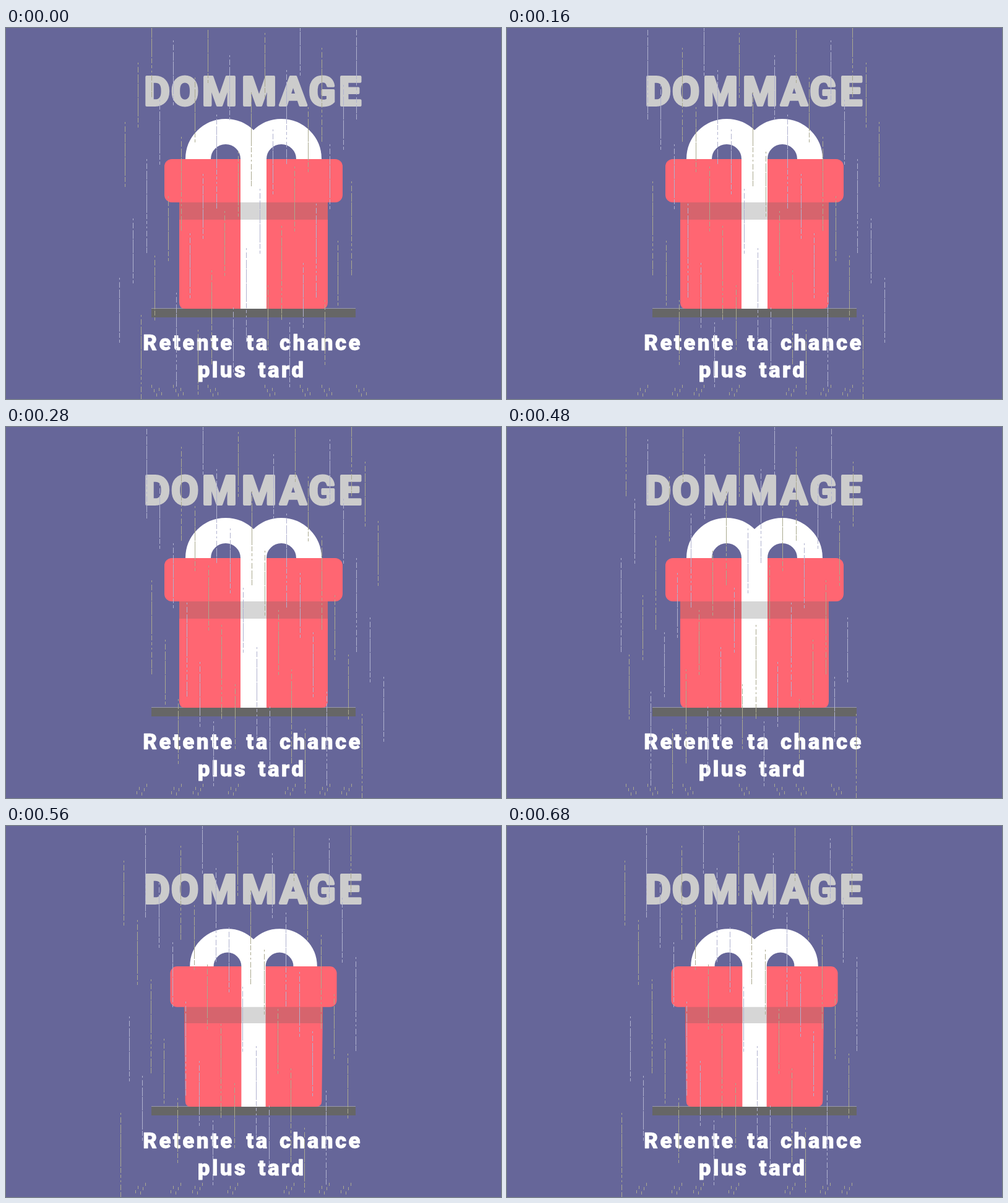
Write an HTML page that moves like this. It is 800 by 600 pixels and loops after 760 ms.

```html
<!DOCTYPE html>
<html lang="fr">
<head>
<meta charset="utf-8">
<title>Dommage</title>
<style>
  html, body { margin: 0; width: 100%; height: 100%; overflow: hidden; background: #669; }
  svg { display: block; width: 100vw; height: 100vh; }
  text { font-family: Roboto, sans-serif; text-anchor: middle; stroke-linejoin: round; }
  #title { font-size: 64px; font-weight: 700; font-stretch: 87.5%; fill: #ccc; stroke: #ccc; stroke-width: 4; }
  #hint { font-size: 35px; font-weight: 800; letter-spacing: 3.4px; fill: #fff; stroke: #fff; stroke-width: .8; }
  .rain path { fill: none; stroke-width: 1; shape-rendering: crispEdges; }
  .drops { stroke-dasharray: 3 4 9 3 14 1 22 1 30 2 8 3 5 4; }
</style>
</head>
<body>
<svg viewBox="0 0 800 600">
  <g id="title"></g>
  <rect x="235" y="454" width="330" height="14" fill="#666"/>
  <path d="M235 453.5H565" stroke="#99a"/>
  <g id="gift">
    <path id="box" fill="#ff6672"/>
    <rect x="256" y="212" width="288" height="70" rx="12" fill="#ff6672"/>
    <path d="M379 212H421V454H379z" fill="#fff"/>
    <path d="M310.5 212a44.5 44.5 0 0 1 89 0M400.5 212a44.5 44.5 0 0 1 89 0" fill="none" stroke="#fff" stroke-width="41"/>
    <path d="M280 282H520V310H280z" fill="#5c5c5c" fill-opacity=".25"/>
  </g>
  <g id="hint"></g>
  <g id="rain"></g>
</svg>
<script>
const $ = id => document.getElementById(id);

// Words or letters, each centred on its own x
const label = (id, y, parts) => {
  $(id).innerHTML += parts.map(([s, x]) => `<text x="${x}" y="${y}">${s}</text>`).join("");
};
label("title", 125, [["D", 244], ["O", 289], ["M", 345], ["M", 409], ["A", 464], ["G", 511], ["E", 556]]);
label("hint", 521, [["Retente", 295], ["ta", 407], ["chance", 509]]);
label("hint", 565, [["plus", 350], ["tard", 446]]);

const tints = ["#aaa98f", "#b0b2cf"];
const golden = 0.618034;

// The golden ratio spreads drops and splashes evenly from left to right
function shower(phase) {
  const column = i => 181.5 + Math.floor((phase + i * golden) % 1 * 388);
  const drops = ["", ""];
  let splashes = "";
  for (let i = 0; i < 45; i++)
    drops[i % 2] += `M${column(i)} ${-40 + i * 12}v${i % 3 ? 108 : 152}`;
  for (let i = 0; i < 7; i++)
    for (let k = 0; k < 5; k++)
      splashes += `M${column(i) + k * 4} ${577 + k * 7 % 16}v5`;
  return `<g class="rain">
    <path class="drops" stroke="${tints[0]}" d="${drops[0]}"/>
    <path class="drops" stroke="${tints[1]}" d="${drops[1]}"/>
    <path stroke="${tints[0]}" d="${splashes}"/></g>`;
}
$("rain").innerHTML = shower(.14) + shower(.03);
const showers = [...document.querySelectorAll(".rain")];

// Each shower appears twice, the second time mirrored
const poses = [
  { end: 160, rain: 0 },
  { end: 360, rain: 0, mirror: 794 },
  { end: 560, rain: 1 },
  { end: 760, rain: 1, mirror: 750, squash: true }
];

function show({ rain, mirror, squash }) {
  showers.forEach((g, i) => g.setAttribute("display", i === rain ? "inline" : "none"));
  $("rain").setAttribute("transform", mirror ? `translate(${mirror} 0) scale(-1 1)` : "");
  $("gift").setAttribute("transform", squash ? "translate(400 454) scale(.9345 .9375) translate(-400 -454)" : "");
  const inset = squash ? 2 : 0;
  $("box").setAttribute("d",
    `M280 270H520L${520 - inset} 444q0 10-10 10H${290 + inset}q-10 0-10-10z`);
}

let origin, current;
function tick(now) {
  origin ??= now;
  const t = (now - origin) % 760;
  const pose = poses.find(p => t < p.end);
  if (pose !== current) show(current = pose);
  requestAnimationFrame(tick);
}
show(poses[0]);
requestAnimationFrame(tick);
</script>
</body>
</html>
```
